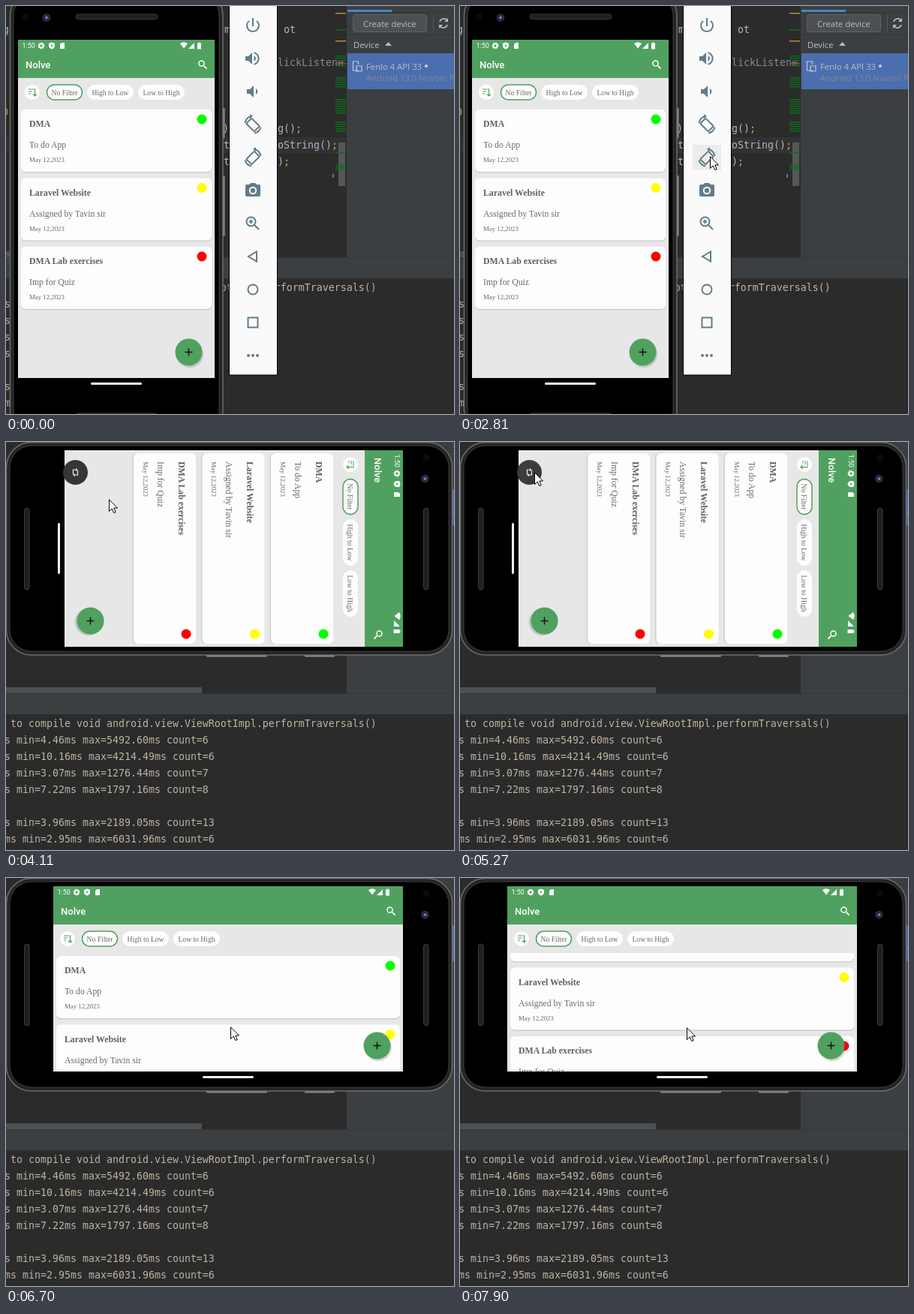
An HTML page for the animation above (8 s loop, 597 by 544 pixels).

```html
<!DOCTYPE html>
<html lang="en">
<head>
<meta charset="utf-8">
<title>Emulator rotation</title>
<style>
html, body { margin: 0; width: 100%; height: 100%; overflow: hidden; background: #2b2b2b; }
svg#stage { display: block; width: 100vw; height: 100vh; }
text { white-space: pre; }
.mono { font: 13.29px "DejaVu Sans Mono", "Noto Sans Mono", monospace; }
.ide { font: 11.3px "Open Sans", "Noto Sans", sans-serif; fill: #bbbcbd; }
.serif { font-family: "Liberation Serif", serif; fill: #6a6a6a; }
.head { font-weight: bold; fill: #606060; }
.bar { font-family: Roboto, sans-serif; fill: #fff; }
.icon { fill: #607d8b; }
.line { fill: none; stroke: #607d8b; stroke-width: 2; }

#phone, #toolbar, #hover, #ibeam, #cursor, #hint, #hintDisc, #hintIcon,
#wide, #turn, #turn .late, #wide .list { animation: 8s step-end infinite; }
#phone { animation-name: tilt; }
#toolbar { animation-name: leave; }
#hover { animation-name: hover; }
#ibeam { animation-name: ibeam; }
#cursor { animation-name: point; }
#hint { animation-name: hint; }
#hintDisc { animation-name: press; }
#hintIcon { animation-name: spin; transform-origin: 92.5px 40.5px; }
#wide { animation-name: arrive; }
#turn { animation-name: turn; transform-origin: 233px 131px; }
#turn .late { animation-name: late; }
#wide .list { animation-name: scroll; }

@keyframes tilt { 0% { transform: none } 37%, 100% { transform: matrix(0, 1, -1, 0, 574, -5) } }
@keyframes leave { 0% { opacity: 1 } 37%, 100% { opacity: 0 } }
@keyframes hover { 0% { opacity: 0 } 33.625% { opacity: .5 } 35.125%, 100% { opacity: 1 } }
@keyframes ibeam { 0% { opacity: 0 } 9% { opacity: 1 } 10.75%, 100% { opacity: 0 } }
@keyframes point {
  0% { transform: translate(-40px, 0) }
  10.75% { transform: translate(353px, 226px) }
  17.75% { transform: translate(345px, 208px) }
  19.375% { transform: translate(340px, 195px) }
  21.25% { transform: translate(336px, 186px) }
  24.75% { transform: translate(333px, 195px) }
  26.625% { transform: translate(333px, 200px) }
  49.5% { transform: translate(320px, 195px) }
  51.375% { transform: translate(137px, 76px) }
  54.625% { transform: translate(106px, 48px) }
  56.125% { transform: translate(100px, 42px) }
  59.375% { transform: translate(99px, 40px) }
  79.125% { transform: translate(298px, 197px) }
  83.75% { transform: translate(299px, 198px) }
  88% { transform: translate(302px, 235px) }
  91% { transform: translate(302px, 221px) }
  98.75%, 100% { transform: translate(302px, 199px) }
}
@keyframes hint { 0% { opacity: 0 } 42.375% { opacity: .5 } 43.875% { opacity: 1 } 72.5%, 100% { opacity: 0 } }
@keyframes press { 0% { fill: #363636 } 64.375% { fill: #444 } 65.875%, 100% { fill: #3c3c3c } }
@keyframes spin {
  0% { transform: rotate(90deg) } 45.875% { transform: rotate(40deg) }
  47.625% { transform: rotate(10deg) } 49.5%, 100% { transform: none }
}
@keyframes arrive { 0% { opacity: 0 } 72.5%, 100% { opacity: 1 } }
@keyframes turn {
  0% { transform: rotate(12.4deg); opacity: .61 }
  74.25% { transform: rotate(5deg); opacity: .85 }
  75.75% { transform: rotate(1.4deg); opacity: .96 }
  77.25%, 100% { transform: none; opacity: 1 }
}
@keyframes late { 0% { opacity: 0 } 83.75%, 100% { opacity: 1 } }
@keyframes scroll {
  0% { transform: none }
  88% { transform: translateY(-5px) }
  89.5% { transform: translateY(-24px) }
  91% { transform: translateY(-46px) }
  92.5% { transform: translateY(-62px) }
  94% { transform: translateY(-72px) }
  95.5%, 100% { transform: translateY(-76px) }
}
</style>
</head>
<body>
<svg id="stage" viewBox="0 0 597 544"></svg>
<script>
const GREEN = '#50a160';

const rect = (x, y, w, h, fill, extra = '') =>
  `<rect x="${x}" y="${y}" width="${w}" height="${h}" fill="${fill}" ${extra}/>`;
const circle = (x, y, r, fill, extra = '') =>
  `<circle cx="${x}" cy="${y}" r="${r}" fill="${fill}" ${extra}/>`;
const text = (x, y, cls, str, extra = '') =>
  `<text x="${x}" y="${y}" class="${cls}" ${extra}>${str}</text>`;
const path = (d, extra = '') => `<path d="${d}" ${extra}/>`;
const group = (x, y, body, extra = '') =>
  `<g transform="translate(${x} ${y})" ${extra}>${body}</g>`;
const code = (x, y, str, fill = '#a9b7c6') => text(x, y, 'mono', str, `fill="${fill}"`);

function consoleLines() {
  const rows = [
    ' to compile void android.view.ViewRootImpl.performTraversals()',
    's min=4.46ms max=5492.60ms count=6',
    's min=10.16ms max=4214.49ms count=6',
    's min=3.07ms max=1276.44ms count=7',
    's min=7.22ms max=1797.16ms count=8',
    '',
    's min=3.96ms max=2189.05ms count=13',
    'ms min=2.95ms max=6031.96ms count=6'
  ];
  return rows.map((row, i) => code(-2, 380 + i * 22, row, '#bfb2a2')).join('');
}

function editor() {
  const mark = (y, fill = '#0d6b1c') => rect(439, y, 14, 1.5, fill);
  const run = (y, n) => Array.from({ length: n }, (_, i) => mark(y + i * 3)).join('');
  return rect(0, 175, 454, 21, '#323232')
    + code(291, 36, 'm') + code(370, 36, 'ot') + code(362, 80, 'lickListene', '#7f8a95')
    + code(289, 168, ')') + code(362, 168, 'g();')
    + code(290, 190, 't') + code(362, 190, 'oString();')
    + code(290, 212, 't') + code(362, 212, ');')
    + code(386, 168, ';', '#cc7832') + code(434, 190, ';', '#cc7832') + code(370, 212, ';', '#cc7832')
    + code(-4, 36, 'g') + code(-5, 146, '0', '#b8a13c')
    + rect(443, 182, 9, 58, '#55575a')
    + mark(9, '#b8912f') + mark(46, '#b8912f') + mark(31) + mark(76, '#a33c50') + run(66, 3) + mark(79)
    + run(95, 5) + run(124, 7) + run(154, 5) + mark(195) + run(211, 3)
    + rect(435, 224, 2, 5, '#5578b0')
    + rect(0, 327, 261, 8, '#4d4f50');
}

function devicePanel() {
  return rect(454, 0, 143, 336, '#3c3f41')
    + rect(455, 5, 59, 3, '#4a88c7') + rect(455, 8, 142, 1, '#323435')
    + rect(462.5, 11.5, 98, 23, '#4c5052', 'rx="3" stroke="#5e6264"')
    + text(476, 28, 'ide', 'Create device')
    + rect(569, 12, 1, 22, '#55585a')
    + path('M578 21a5.5 5.5 0 0 1 10-1.5M588 25a5.5 5.5 0 0 1-10 1.5', 'fill="none" stroke="#bbb" stroke-width="1.6"')
    + path('M589 16v5h-5zM577 30v-5h5z', 'fill="#bbb"')
    + rect(455, 38, 142, 1, '#323435')
    + text(463, 56, 'ide', 'Device') + path('M505 53l4.5-5 4.5 5z', 'fill="#bbb"')
    + rect(455, 63, 142, 48, '#4b6eaf')
    + path('M470 86h-7.5v-12h7v4M467 80h7v7h-7z', 'fill="none" stroke="#c3c8d0" stroke-width="1.2"')
    + text(480, 85, 'ide', 'Fenlo 4 API 33') + circle(560, 80, 2, '#c9d3e3')
    + text(480, 100, 'ide', 'Android 13.0 Nuvolo P', 'style="fill:#85888d"');
}

function toolbar() {
  const at = (y, body) => group(317, y - 12, body, 'class="icon"');
  const speaker = 'v6h4l5 5V4l-5 5z';
  const rotate = (y, flip = '') => at(y, `<g transform="${flip}">`
    + '<rect x="7" y="5" width="10" height="15" rx="1" transform="rotate(-45 12 12.5)" class="line"/>'
    + path('M1.5 10a11 11 0 0 1 8-9M14 23.5a11 11 0 0 0 8.5-8', 'class="line"')
    + path('M8 -2l4 3-4 3z') + '</g>');
  return rect(297.5, -1, 64, 493, '#fafafa', 'stroke="#000"')
    + rect(310, 185, 38, 34, '#ececec', 'id="hover"')
    + at(26, path('M13 2h-2v11h2zM17.8 5.2l-1.4 1.4A7 7 0 1 1 7.6 6.6L6.2 5.2A9 9 0 1 0 17.8 5.2z'))
    + at(70, path('M2 9' + speaker + 'M13.5 8v8a4.5 4.5 0 0 0 0-8zM13.5 3.2v2.1a7 7 0 0 1 0 13.4v2.1a9 9 0 0 0 0-17.6z'))
    + at(114, path('M4 9' + speaker + 'M16 8v8a4.5 4.5 0 0 0 0-8z'))
    + rotate(158) + rotate(202, 'translate(24 0) scale(-1 1)')
    + at(246, path('M9 2L7.2 4H4a2 2 0 0 0-2 2v12a2 2 0 0 0 2 2h16a2 2 0 0 0 2-2V6a2 2 0 0 0-2-2h-3.2L15 2z')
      + circle(12, 12, 4.2, '#607d8b', 'stroke="#fafafa" stroke-width="2"'))
    + at(290, '<g class="line">' + circle(9.5, 9.5, 6, 'none') + path('M14 14l6 6M9.5 6.8v5.4M6.8 9.5h5.4') + '</g>')
    + at(334, path('M17 5.5v13L6 12z', 'class="line"'))
    + at(378, circle(12, 12, 6.5, 'none', 'class="line"'))
    + at(422, rect(5.5, 5.5, 13, 13, 'none', 'class="line"'))
    + at(466, [6, 12, 18].map(x => circle(x, 12, 2, '#607d8b')).join(''));
}

function statusBar(W) {
  return '<g class="late">' + text(5.5, 11, 'bar', '1:50', 'font-size="9"')
    + circle(31, 8, 2.6, 'none', 'stroke="#fff" stroke-width="1.8"')
    + circle(31, 8, 3.9, 'none', 'stroke="#fff" stroke-width="1.2" stroke-dasharray="1.5 1.56"')
    + path('M45 3.5l4 1.3v3.2q0 3-4 4.5q-4-1.5-4-4.5v-3.2z', 'fill="#fff"')
    + path('M44 6.2l2.8 1.8-2.8 1.8z', `fill="${GREEN}"`)
    + path('M58 4h4v8h-6v-6z', 'fill="#fff"')
    + group(W, 0, path('M-46 5q5-3.5 10 0l-5 6.5zM-27 4v8h-8zM-23 4.5h1.5v-1h2v1h1.5v8h-5z', 'fill="#fff"'))
    + '</g>';
}

function card(i, W, title, note, color) {
  return group(4, 4 + i * 91.5,
    rect(0, .8, W - 8, 83.6, '#cfcfcf', 'rx="6"') + rect(0, 0, W - 8, 83, '#fdfdfd', 'rx="6"')
    + text(11, 23, 'serif head', title, 'font-size="11.8"')
    + text(11, 51, 'serif', note, 'font-size="11.7"')
    + text(11, 70, 'serif', 'May 12,2023', 'font-size="8.8"')
    + circle(W - 21, 13, 6.5, color));
}

function chip(x, w, label, border = 'none') {
  return rect(x, 60, w, 20, '#fdfdfd', `rx="10" stroke="${border}" stroke-width="1.5"`)
    + text(x + w / 2, 73.5, 'serif', label, 'font-size="9.6" text-anchor="middle"');
}

function app(W, H) {
  return rect(0, 0, W, H, '#e7e7e7')
    + circle(19, 70, 10, '#fdfdfd')
    + path('M14 66h7M14 69h5M14 72h3M22.5 65v10M20 72.5l2.5 2.5 2.5-2.5', `fill="none" stroke="${GREEN}" stroke-width="1.2"`)
    + chip(38.5, 47, 'No Filter', GREEN) + chip(92, 62, 'High to Low') + chip(160, 62, 'Low to High')
    + `<svg y="89" width="${W}" height="${H - 89}"><g class="list">`
    + card(0, W, 'DMA', 'To do App', '#0f0')
    + card(1, W, 'Laravel Website', 'Assigned by Tavin sir', '#ff0')
    + card(2, W, 'DMA Lab exercises', 'Imp for Quiz', '#f00')
    + '</g></svg>'
    + rect(0, 0, W, 51, GREEN) + statusBar(W)
    + text(10, 38, 'bar', 'Nolve', 'font-size="13" font-weight="500"')
    + group(W - 16, 33, path('M1.8 1.8L5.5 5.5', 'stroke="#fff" stroke-width="1.8"')
      + circle(-1.5, -1.5, 3.6, 'none', 'stroke="#fff" stroke-width="1.5"'))
    + group(W - 34.5, H - 34.5, circle(1.5, 3, 18.5, '#000', 'opacity=".07"') + circle(1.5, 2.5, 17.5, '#000', 'opacity=".1"')
      + circle(0, 0, 18, GREEN) + path('M-5 0H5M0-5V5', 'stroke="#111" stroke-width="1.4"'));
}

function phone() {
  const slot = y => rect(93, y, 109, 6.5, '#1f1f20', 'rx="3.2" stroke="#3c3c3d"');
  return rect(287, 136, 4.5, 40, '#8d8d8d', 'rx="1"') + rect(287, 226, 4.5, 81, '#8d8d8d', 'rx="1"')
    + rect(5.5, -20.5, 283.5, 594, '#252526', 'rx="33" stroke="#6c6c6d" stroke-width="1.5"')
    + rect(10, -16, 274, 585, '#000', 'rx="29" stroke="#3a3a3b"')
    + slot(11) + slot(543)
    + circle(26, 14, 4.5, '#0b0b0c')
    + circle(54, 15.5, 4.5, '#20242e', 'stroke="#333438" stroke-width="1.5"') + circle(54, 15.5, 2, '#5b80c8')
    + group(16, 45, app(262, 451))
    + rect(113, 502, 68, 3, '#f2f2f2', 'rx="1.5"');
}

function wideScreen() {
  return '<svg id="wide" x="63" y="11" width="466" height="262">' + rect(0, 0, 466, 262, '#ccc')
    + '<g id="turn">' + rect(0, 0, 466, 262, '#000') + app(466, 247)
    + rect(199, 253, 68, 3, '#f2f2f2', 'rx="1.5" class="late"') + '</g></svg>';
}

function rotateHint() {
  return '<g id="hint">' + circle(92.5, 40.5, 16.5, '#3c3c3c', 'id="hintDisc"')
    + '<g id="hintIcon">' + path('M89.5 43.5v-6.5h4M95.5 37.5v6.5h-4', 'fill="none" stroke="#eee" stroke-width="1.2"')
    + path('M93 35l2.5 2-2.5 2zM92 42l-2.5 2 2.5 2z', 'fill="#eee"') + '</g></g>';
}

document.getElementById('stage').innerHTML =
  rect(0, 0, 597, 544, '#2b2b2b') + editor() + devicePanel()
  + rect(0, 336, 597, 27, '#3c3f41') + rect(0, 335, 597, 1, '#323435')
  + consoleLines()
  + `<g id="phone">${phone()}</g><g id="toolbar">${toolbar()}</g>`
  + wideScreen() + rotateHint()
  + path('M423 485.5h3M427 485.5h3M426.5 486v14M423 500.5h3M427 500.5h3', 'id="ibeam" stroke="#ddd"')
  + '<g id="cursor">' + path('M.5 .8V16.5L4.2 13L6.7 18.5L9.2 17.5L6.8 12H11.5z', 'fill="#fff" stroke="#000"') + '</g>';
</script>
</body>
</html>
```
